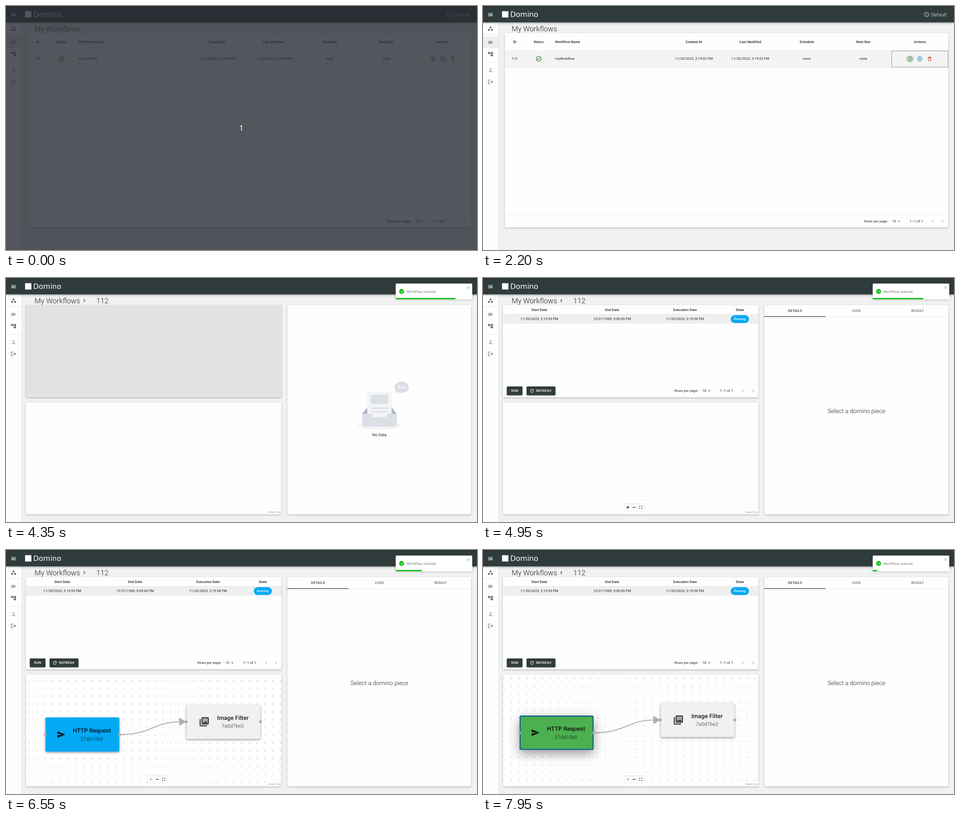
An HTML page with a canvas that plays this animation: 1038x540 px, repeating every 8000 ms.

```html
<!DOCTYPE html>
<html lang="en">
<head>
<meta charset="utf-8">
<title>My Workflows</title>
<style>
html, body { margin: 0; width: 100%; height: 100%; overflow: hidden; background: #f0f2f1; }
canvas { display: block; width: 100vw; height: 100vh; }
</style>
</head>
<body>
<canvas id="stage"></canvas>
<script>
const W = 1038, H = 540, LOOP = 8000, STEP = 50;
const UNIT = W / 1920;            // stage pixels per interface pixel
const BODY = 14 * UNIT, ICON = 24 * UNIT;

// Moments of the story, in ms
const T = {
  rowHover: 450, buttonHover: 1600, click: 1650, toast: 2550, progress: 3250,
  runPage: 4000, runData: 4700, nodes: 6350, pan: 6600, done: 7200, select: 7500
};

const C = {
  bar: '#303b3b', page: '#f0f2f1', paper: '#fefefe', line: '#e0e0e0',
  ink: 'rgba(0,0,0,.87)', soft: 'rgba(0,0,0,.6)', faint: 'rgba(0,0,0,.28)',
  green: '#2e7d32', blue: '#0288d1', red: '#d0402f', running: '#03a9f4',
  success: '#4caf50', selected: '#01579b', toast: '#07bc0c', edge: '#adaeae'
};

const RING = 'M12 2C6.48 2 2 6.48 2 12s4.48 10 10 10 10-4.48 10-10S17.52 2 12 2zm0 18c-4.42 0-8-3.58-8-8s3.58-8 8-8 8 3.58 8 8-3.58 8-8 8z';
const icons = {
  menu: 'M3 18h18v-2H3v2zm0-5h18v-2H3v2zm0-7v2h18V6H3z',
  spaces: 'M6 13c-2.2 0-4 1.8-4 4s1.8 4 4 4 4-1.8 4-4-1.8-4-4-4zm6-10C9.8 3 8 4.8 8 7s1.8 4 4 4 4-1.8 4-4-1.8-4-4-4zm6 10c-2.2 0-4 1.8-4 4s1.8 4 4 4 4-1.8 4-4-1.8-4-4-4z',
  list: 'M3 9h14V7H3v2zm0 4h14v-2H3v2zm0 4h14v-2H3v2zm16 0h2v-2h-2v2zm0-10v2h2V7h-2zm0 6h2v-2h-2v2z',
  tree: 'M22 11V3h-7v3H9V3H2v8h7V8h2v10h4v3h7v-8h-7v3h-2V8h2v3z',
  person: 'M12 12c2.21 0 4-1.79 4-4s-1.79-4-4-4-4 1.79-4 4 1.79 4 4 4zm0 2c-2.67 0-8 1.34-8 4v2h16v-2c0-2.66-5.33-4-8-4z',
  logout: 'm17 7-1.41 1.41L18.17 11H8v2h10.17l-2.58 2.58L17 17l5-5zM4 5h8V3H4c-1.1 0-2 .9-2 2v14c0 1.1.9 2 2 2h8v-2H4V5z',
  check: RING + 'M16.59 7.58 10 14.17l-3.59-3.58L5 12l5 5 8-8z',
  play: RING + 'm-2-3.5 6-4.5-6-4.5v9z',
  pause: RING + 'M9 16h2V8H9zM13 16h2V8h-2z',
  trash: 'M6 19c0 1.1.9 2 2 2h8c1.1 0 2-.9 2-2V7H6v12zM8 9h8v10H8V9zm7.5-5-1-1h-5l-1 1H5v2h14V4z',
  refresh: 'M17.65 6.35C16.2 4.9 14.21 4 12 4c-4.42 0-7.99 3.58-7.99 8s3.57 8 7.99 8c3.73 0 6.84-2.55 7.73-6h-2.08c-.82 2.33-3.04 4-5.65 4-3.31 0-6-2.69-6-6s2.69-6 6-6c1.66 0 3.14.69 4.22 1.78L13 11h7V4l-2.35 2.35z',
  send: 'M2.01 21 23 12 2.01 3 2 10l15 2-15 2z',
  photos: 'M20 4v12H8V4h12m0-2H8c-1.1 0-2 .9-2 2v12c0 1.1.9 2 2 2h12c1.1 0 2-.9 2-2V4c0-1.1-.9-2-2-2zm-8.5 9.67 1.69 2.26 2.48-3.1L19 15H9zM2 6v14c0 1.1.9 2 2 2h14v-2H4V6H2z',
  photoFill: 'M20 4H8v12h12z',
  next: 'M10 6 8.59 7.41 13.17 12l-4.58 4.59L10 18l6-6z',
  prev: 'M15.41 7.41 14 6l-6 6 6 6 1.41-1.41L10.83 12z',
  down: 'M7 10l5 5 5-5z',
  done: 'M12 0a12 12 0 1012 12A12.014 12.014 0 0012 0zm6.927 8.2l-6.845 9.289a1.011 1.011 0 01-1.43.188l-4.888-3.908a1 1 0 111.25-1.562l4.076 3.261 6.227-8.451a1 1 0 111.61 1.183z',
  close: 'M18.4 7 17 5.6l-5 5-5-5L5.6 7l5 5-5 5L7 18.4l5-5 5 5 1.4-1.4-5-5z',
  fit: 'M3 9V3h6v2.5H5.500V9zM15 3h6v6h-2.500V5.500H15zM3 15h2.500v3.500H9V21H3zM18.500 15H21v6h-6v-2.500h3.500z'
};
for (const k in icons) icons[k] = new Path2D(icons[k]);

const box = {
  back: new Path2D('M122.034 69.674L98.109 40.229c-1.148-1.386-2.826-2.225-4.593-2.225h-51.44c-1.766 0-3.444.839-4.592 2.225L13.56 69.674v15.383h108.475z'),
  tray: new Path2D('M121.813 105.032c-.775 3.071-3.497 5.36-6.735 5.36H20.515c-3.238 0-5.96-2.29-6.734-5.36a7.309 7.309 0 0 1-.222-1.79V69.675h26.318c2.907 0 5.25 2.448 5.25 5.42 0 2.971 2.37 5.41 5.277 5.41h34.785c2.907 0 5.277-2.421 5.277-5.393 0-2.972 2.343-5.438 5.25-5.438h26.318v33.569c0 .617-.077 1.216-.221 1.789z'),
  bubble: new Path2D('M149.121 33.292l-6.83 2.65a1 1 0 0 1-1.317-1.23l1.937-6.207c-2.589-2.944-4.109-6.534-4.109-10.408C138.802 8.102 148.92 0 161.402 0 173.881 0 184 8.102 184 18.097c0 9.995-10.118 18.097-22.599 18.097-4.528 0-8.744-1.066-12.28-2.902z')
};

const canvas = document.getElementById('stage');
const ctx = canvas.getContext('2d');
const dpr = window.devicePixelRatio || 1;
canvas.width = W * dpr;
canvas.height = H * dpr;

const clamp = v => Math.max(0, Math.min(1, v));
const ramp = (t, start, length) => clamp((t - start) / length);
const easeOut = p => 1 - (1 - p) ** 3;
const easeInOut = p => p * p * (3 - 2 * p);
const mix = (a, b, p) => a + (b - a) * p;

function rect(x, y, w, h, fill, r = 0) {
  ctx.beginPath();
  ctx.roundRect(x, y, w, h, r);
  ctx.fillStyle = fill;
  ctx.fill();
}

function circle(x, y, r, fill) {
  ctx.beginPath();
  ctx.arc(x, y, r, 0, 7);
  ctx.fillStyle = fill;
  ctx.fill();
}

function shadowRect(x, y, w, h, fill, r, blur, drop, alpha) {
  ctx.save();
  ctx.shadowColor = `rgba(0,0,0,${alpha})`;
  ctx.shadowBlur = blur * dpr;
  ctx.shadowOffsetY = drop * dpr;
  rect(x, y, w, h, fill, r);
  ctx.restore();
}

const card = (x, y, w, h, fill = C.paper) => shadowRect(x, y, w, h, fill, 2, 3, 1, .34);
const hLine = (x, y, w) => rect(x, y, w, .7, C.line);

function text(str, x, y, { size = BODY, weight = 400, fill = C.ink, align = 'center', space = .0107, font = 'Roboto' } = {}) {
  ctx.font = `${weight} ${size}px "${font}", sans-serif`;
  ctx.letterSpacing = size * space + 'px';
  ctx.textRendering = 'geometricPrecision';
  ctx.textAlign = align;
  ctx.fillStyle = fill;
  ctx.fillText(str, x, y);
}

function icon(name, x, y, fill, size = ICON) {
  ctx.save();
  ctx.translate(x - size / 2, y - size / 2);
  ctx.scale(size / 24, size / 24);
  ctx.fillStyle = fill;
  ctx.fill(icons[name]);
  ctx.restore();
}

function drawHeader() {
  shadowRect(0, 0, W, 36.3, C.bar, 0, 5, 1.5, .4);
  rect(0, 0, W, 1.2, '#1e2827');
  icon('menu', 16.5, 18.9, '#fff');
  rect(42, 11.500, 14, 14, '#fff');
  text('Domino', 60, 23.500, { size: 15.900, fill: '#fff', align: 'left', space: 0, font: 'DejaVu Sans' });
  ctx.beginPath();
  ctx.arc(977.5, 19, 5, 0, 7);
  ctx.lineWidth = 1;
  ctx.strokeStyle = '#eef0f0';
  ctx.stroke();
  for (const dx of [-1.2, 1.2])
    for (const dy of [-1.5, 1.5]) circle(977.5 + dx, 19 + dy, .7, '#dfe3e3');
  text('Default', 987.700, 22.900, { size: 10.8, weight: 300, fill: '#fff', align: 'left', space: 0 });
}

function drawSidebar(listActive) {
  rect(0, 36, 34, H - 36, C.paper);
  rect(34, 36, .7, H - 36, C.line);
  if (listActive) rect(0, 68, 34, 25.7, '#edeeed');
  hLine(0, 63, 34);
  hLine(0, 124, 34);
  const items = [['spaces', 50], ['list', 80.5], ['tree', 106.5], ['person', 142], ['logout', 168]];
  for (const [name, y] of items) icon(name, 16.6, y, name === 'person' ? C.faint : C.soft);
}

const title = (str, x) => text(str, x, 55.900, { size: 16.15, weight: 300, align: 'left', space: 0 });

function drawPager(x, y) {
  const left = { align: 'left' };
  text('Rows per page:', x, y, left);
  text('10', x + 61.7, y, left);
  icon('down', x + 77, y - 2.500, C.soft);
  text('1–1 of 1', x + 100.3, y, left);
  icon('prev', x + 151.500, y - 2.800, C.faint);
  icon('next', x + 173, y - 2.800, C.faint);
}

function drawListPage(t) {
  title('My Workflows', 63);
  card(48, 60, 977.3, 430.5);
  if (t >= T.rowHover) rect(48, 99, 977.3, 36, '#f4f5f2');
  for (const y of [98.400, 135, 461.2]) hLine(48, y, 977.3);

  const cols = [['ID', 69.8, '112'], ['Status', 122.5, ''], ['Created At', 464.8, '11/20/2023, 3:19:02 PM'],
    ['Last Modified', 589.3, '11/20/2023, 3:19:02 PM'], ['Schedule', 713.6, 'none'],
    ['Next Run', 838.2, 'none'], ['Actions', 962.7, '']];
  for (const [head, x, value] of cols) {
    text(head, x, 82.2, { weight: 500 });
    text(value, x, 119.2);
  }
  text('Workflow Name', 159, 82.2, { weight: 500, align: 'left' });
  text('myWorkflow', 159, 119.2, { align: 'left' });

  circle(941, 117, 9.6, `rgba(0,0,0,${.065 * ramp(t, T.buttonHover, 150)})`);
  const age = t - T.click;
  if (age >= 0) {
    const fade = 1 - clamp((age - 200) / 350);
    circle(941, 117, 9.6 * easeOut(clamp(age / 350)), `rgba(46,125,50,${.22 * fade})`);
    ctx.strokeStyle = '#8b8d8b';
    ctx.lineWidth = .9;
    ctx.strokeRect(900.6, 99.4, 124.1, 35.7);
  }
  icon('check', 122.7, 117, C.green, 14.2);
  icon('play', 941, 117, C.green);
  icon('pause', 962.700, 117, C.blue);
  icon('trash', 984.3, 117, C.red);
  drawPager(840, 479);
}

function drawEmpty() {
  ctx.save();
  ctx.translate(758.3, 229);
  ctx.scale(.705, .705);
  ctx.fillStyle = '#dce0e6';
  ctx.fill(box.bubble);
  for (const x of [152.500, 161.4, 170.3]) circle(x, 18.4, 2.8, '#fff');
  ctx.translate(24, 31.67);
  ctx.beginPath();
  ctx.ellipse(67.8, 106.9, 67.8, 12.7, 0, 0, 7);
  ctx.fillStyle = '#f5f5f6';
  ctx.fill();
  ctx.fillStyle = '#aeb8c2';
  ctx.fill(box.back);
  rect(29.8, 0, 76, 101.3, '#f3f4f5', 4);
  rect(40.7, 10, 54.2, 29, '#dce0e6', 2);
  for (const y of [49.8, 61.5]) rect(40.7, y, 54.2, 4.5, '#dce0e6', 2.2);
  ctx.fillStyle = '#dce0e6';
  ctx.fill(box.tray);
  ctx.restore();
  text('No Data', 823, 350.400, { size: 16 * UNIT });
}

function drawRuns() {
  hLine(43.5, 80.3, 563.5);
  rect(43.5, 81, 563.5, 20, '#eeefee');
  const cols = [['Start Date', 124, '11/20/2023, 3:19:59 PM'], ['End Date', 284.6, '12/31/1969, 9:00:00 PM'],
    ['Execution Date', 445.2, '11/20/2023, 3:19:58 PM'], ['State', 566, '']];
  for (const [head, x, value] of cols) {
    text(head, x, 73.2, { weight: 500 });
    text(value, x, 93.2);
  }
  rect(546, 82.2, 40, 17.3, C.running, 8.65);
  text('Running', 566, 93.3, { size: 13 * UNIT, weight: 500, fill: '#fff' });

  const label = { weight: 500, fill: '#fff', space: .0286 };
  for (const [x, w] of [[52.5, 34.5], [96, 63.700]]) shadowRect(x, 240, w, 19.6, C.bar, 2, 2.500, 1, .35);
  text('RUN', 69.8, 252.400, label);
  icon('refresh', 107.7, 249.8, '#fff', 11.5);
  text('REFRESH', 117, 252.400, { ...label, align: 'left' });
  drawPager(421.8, 252.400);
}

function drawTabs() {
  ['DETAILS', 'LOGS', 'RESULT'].forEach((name, i) =>
    text(name, 687.6 + i * 135.1, 75.2, { weight: 500, space: .0286, fill: i ? C.soft : C.bar }));
  hLine(620, 85.8, 405.3);
  rect(620, 84.700, 135.3, 1.2, C.bar);
  text('Select a domino piece', 823, 299.2, { size: 13.2, weight: 300, space: 0 });
}

function drawDots(x0, y0, gap, r, fill) {
  ctx.fillStyle = fill;
  ctx.beginPath();
  for (let y = y0; y < 523.5; y += gap)
    for (let x = x0; x < 607; x += gap) {
      ctx.moveTo(x + r, y);
      ctx.arc(x, y, r, 0, 7);
    }
  ctx.fill();
}

function drawNode(x, y, name, id, fill, lift) {
  if (lift) shadowRect(x, y, 162.700, 75.700, fill, 3, mix(5, 24, lift), mix(2, 8, lift), .42);
  else shadowRect(x, y, 162.700, 75.700, fill, 3, 5, 2, .4);
  if (lift) {
    ctx.beginPath();
    ctx.roundRect(x + 1, y + 1, 160.700, 73.700, 2.5);
    ctx.lineWidth = 2.1;
    ctx.strokeStyle = C.selected;
    ctx.stroke();
  }
  text(name, x + 102.2, y + 33.4, { size: 12.97, weight: 500, space: 0 });
  text(id, x + 102.2, y + 51, { size: 10.9, fill: C.soft });
}

function drawGraph(t) {
  const p = easeInOut(ramp(t, T.pan, 200));
  const dx = -6.2 * p, dy = -4 * p;
  drawDots(51.500 + dx, 289 + dy, 17.3, .65, '#4f5151');
  ctx.save();
  ctx.translate(dx, dy);

  ctx.beginPath();
  ctx.moveTo(250, 408.4);
  ctx.bezierCurveTo(323, 408.4, 323, 380.2, 386, 380.2);
  ctx.lineWidth = 2;
  ctx.strokeStyle = C.edge;
  ctx.stroke();
  ctx.beginPath();
  ctx.moveTo(381.800, 370.8);
  ctx.lineTo(396.500, 380.2);
  ctx.lineTo(381.800, 389.6);
  ctx.fillStyle = C.edge;
  ctx.fill();

  const lift = t >= T.select ? Math.max(.05, easeInOut(ramp(t, T.select, 300))) : 0;
  drawNode(87, 370.6, 'HTTP Request', '27dd10b0', t < T.done ? C.running : C.success, lift);
  drawNode(397.700, 342.4, 'Image Filter', '7a0d7be2', C.page, 0);
  icon('send', 121.500, 408.4, C.ink, 19.8);
  icon('photoFill', 436.8, 380.2, 'rgba(0,0,0,.3)', 24);
  icon('photos', 436.8, 380.2, C.ink, 24);
  for (const [x, y] of [[86.3, 408.4], [250.3, 408.4], [397, 380.2], [561, 380.2]]) circle(x, y, 3.2, C.edge);
  ctx.restore();
}

function drawControls(maxZoom) {
  shadowRect(312, 500.4, 43, 14.6, C.paper, 0, 2, 0, .22);
  for (const x of [326.2, 340.500]) rect(x, 500.4, .6, 14.6, '#eee');
  const plus = maxZoom ? '#aaa' : '#111';
  rect(316, 506.9, 6.5, 1.3, plus);
  rect(318.6, 504.3, 1.3, 6.5, plus);
  rect(330.1, 506.9, 6.5, 1.3, '#111');
  icon('fit', 347.600, 507.5, '#111', 8.6);
}

function drawRunPage(t) {
  const loaded = t >= T.runData, graph = t >= T.nodes;
  title('My Workflows', 63);
  icon('next', 172.5, 50.3, C.ink);
  title('112', 199);
  card(43.5, 60, 563.5, 204.5, loaded ? C.paper : '#e2e2e1');
  card(43.5, 275.5, 563.5, 248);
  card(620, 60, 405.3, 463.5);

  ctx.save();
  ctx.beginPath();
  ctx.rect(43.5, 275.5, 563.5, 248);
  ctx.clip();
  if (graph) drawGraph(t);
  else drawDots(52.1, 284.2, 16 * UNIT, .36, '#a0a2a6');
  rect(576.5, 514, 30.500, 9.4, 'rgba(255,255,255,.5)');
  text('React Flow', 605.8, 520, { size: 10 * UNIT, fill: '#999', align: 'right', space: 0 });
  if (loaded) drawControls(graph);
  ctx.restore();

  if (loaded) {
    drawRuns();
    drawTabs();
  } else drawEmpty();
}

// Bounce in from the right: [share of duration, offset]
const bounce = [[0, 3000], [.6, -25], [.75, 10], [.9, -5], [1, 0]];

function bounceAt(p) {
  const i = Math.max(1, bounce.findIndex(k => k[0] >= p));
  const [p0, x0] = bounce[i - 1], [p1, x1] = bounce[i];
  return mix(x0, x1, easeOut((p - p0) / (p1 - p0))) * UNIT;
}

function drawToast(t) {
  const p = ramp(t, T.toast, 700);
  ctx.save();
  ctx.globalAlpha = easeOut(clamp(p / .6));
  ctx.translate(bounceAt(p), 0);
  shadowRect(858.8, 12.3, 168.7, 34.7, '#fff', 2, 6, .6, .22);
  icon('done', 871.8, 29.7, C.toast, 20 * UNIT);
  text('Workflow started', 882.500, 32.700, { fill: '#757575', align: 'left', space: 0, font: 'DejaVu Sans' });
  icon('close', 1019.2, 21.2, '#a5a5a5', 10.5);
  const left = 1 - ramp(t, T.progress, 5000);
  rect(858.8, 44.3, 168.7 * left, 2.7, C.toast, [0, 0, 0, 1.5]);
  ctx.restore();
}

function drawCountdown() {
  rect(0, 0, W, H, 'rgba(40,44,52,.8)');
  text('1', 518.5, 276, { size: 17, fill: '#fff', space: 0 });
}

function draw(t) {
  ctx.setTransform(dpr, 0, 0, dpr, 0, 0);
  rect(0, 0, W, H, C.page);
  const runPage = t >= T.runPage;
  drawSidebar(!runPage);
  (runPage ? drawRunPage : drawListPage)(t);
  drawHeader();
  if (t >= T.toast) drawToast(t);
  if (t < STEP) drawCountdown();
}

const start = performance.now();
function tick() {
  const t = (performance.now() - start) % LOOP;
  draw(Math.floor(t / STEP) * STEP);
  requestAnimationFrame(tick);
}
tick();
</script>
</body>
</html>
```
